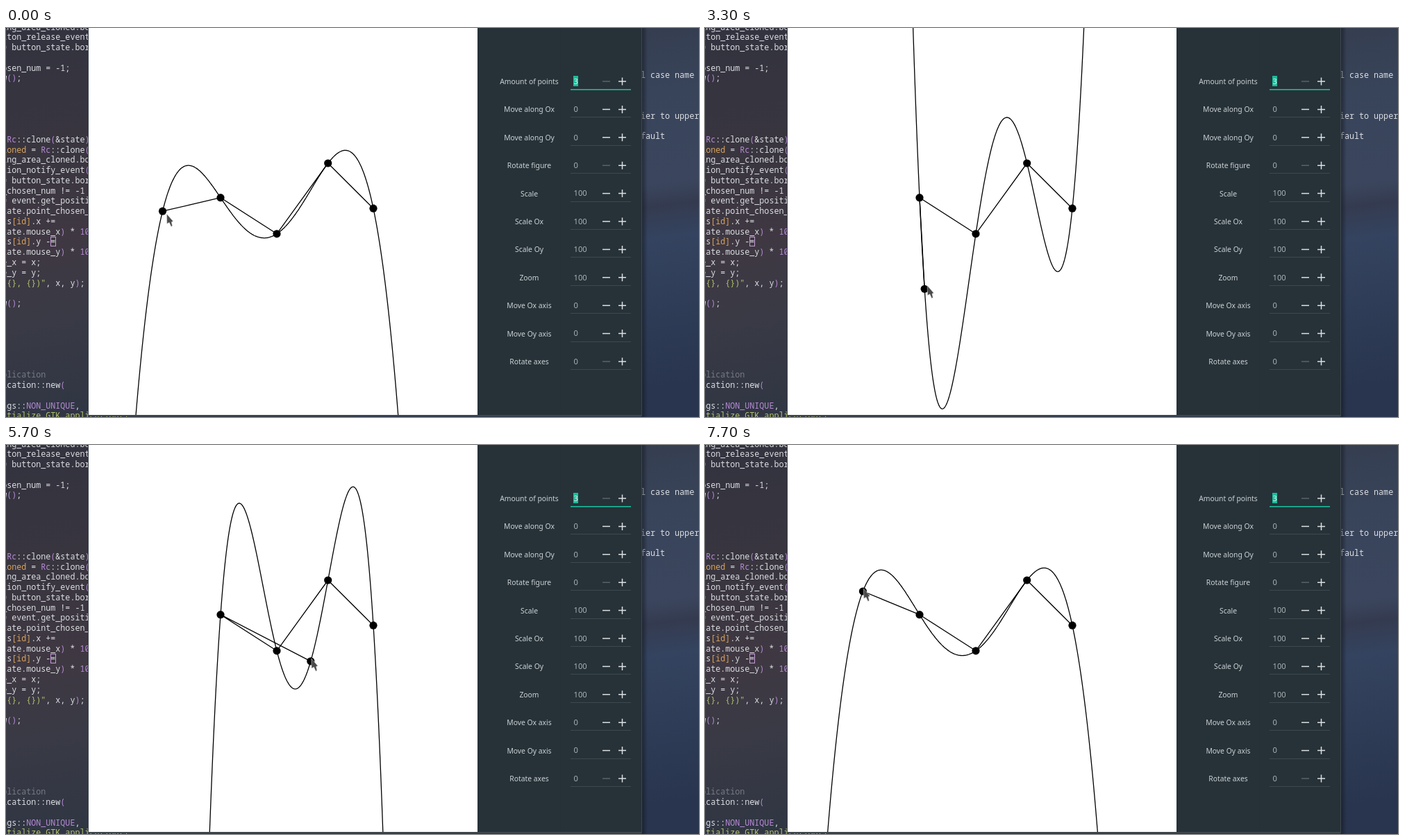
Animation, 998 px wide and 561 px high, one loop 8000 ms. Source, as an HTML page:

```html
<!DOCTYPE html>
<html lang="en">
<meta charset="utf-8">
<title>Curve editor</title>
<style>
  html, body { margin: 0; width: 100%; height: 100%; overflow: hidden; background: #2c2e3e; }
  svg { display: block; }
  text { white-space: pre; }
  .code { font: 11.7px "Noto Sans Mono", "DejaVu Sans Mono", monospace; fill: #dcdee2; }
  .lilac { fill: #b78bd6; }
  .gold { fill: #d9a45c; }
  .green { fill: #b3c46c; }
  .grey { fill: #777a84; }
  .label { font: 10.35px "Noto Sans", sans-serif; fill: #cbd1d4; text-anchor: middle; }
  .value { font: 11.2px "Noto Sans", sans-serif; fill: #a9b1b5; }
</style>
<svg width="998" height="561">
  <defs>
    <linearGradient id="left" x2=".15" y2="1">
      <stop offset="0" stop-color="#32333f"/><stop offset=".3" stop-color="#38353f"/>
      <stop offset=".55" stop-color="#3f3842"/><stop offset=".75" stop-color="#393a45"/>
      <stop offset="1" stop-color="#303643"/>
    </linearGradient>
    <linearGradient id="right" x2=".1" y2="1">
      <stop offset="0" stop-color="#343b4c"/><stop offset=".25" stop-color="#38445a"/>
      <stop offset=".48" stop-color="#3b465e"/><stop offset=".54" stop-color="#343b50"/>
      <stop offset=".62" stop-color="#34435f"/><stop offset="1" stop-color="#29354e"/>
    </linearGradient>
    <linearGradient id="shade">
      <stop offset="0" stop-color="#10141c" stop-opacity=".6"/>
      <stop offset="1" stop-color="#10141c" stop-opacity="0"/>
    </linearGradient>
  </defs>
  <rect width="500" height="561" fill="url(#left)"/>
  <rect x="500" width="498" height="561" fill="url(#right)"/>
  <g id="code"></g>
  <rect x="915" width="9" height="561" fill="url(#shade)"/>
  <rect x="118" width="798" height="560" fill="#3d474c"/>
  <rect x="679" width="236" height="558" fill="#263238"/>
  <rect x="798" width="1" height="558" fill="#243035"/>
  <g id="panel"></g>
  <svg x="119" width="560" height="558" viewBox="119 0 560 558">
    <rect x="119" width="560" height="558" fill="#fff"/>
    <g fill="none" stroke="#000" stroke-width="1.3" stroke-linejoin="round">
      <path id="curve"/><path id="chain"/>
    </g>
    <g id="dots"></g>
    <path id="cursor" d="M0 0L.3 14L3.6 12.2L6.4 18.3L8 17L6.8 11.6L9.2 10.6Z"
      fill="#4a4a4a" stroke="#ddd" stroke-width=".5"/>
  </svg>
</svg>
<script>
const $ = id => document.getElementById(id);

// Editor text behind the window
const source = `ing_area_cloned.bor
tton_release_event
= button_state.bor

osen_num = -1;
w();





 Rc::clone(&state)
loned = Rc::clone(
ing_area_cloned.bo
tion_notify_event(
= button_state.bor
_chosen_num != -1
= event.get_positi
tate.point_chosen_
ts[id].x +=
tate.mouse_x) * 10
ts[id].y -=
tate.mouse_y) * 10
e_x = x;
e_y = y;
({}, {})", x, y);

w();






plication
ication::new(

ags::NON_UNIQUE,
itialize GTK application()`;
const notes = '\n\n\n\n\nl case name\n\n\n\nier to upper\n\nfault';

const tokens = /(?<green>^\(\{.*"|^itialize.*)|(?<grey>^plication)|(?<gold>\bid\b|[[\]]|^loned)|(?<lilac>\bRc\b|NON_UNIQUE|\b10\b|[()])/g;
const paint = s => s.replace(/&/g, '&amp;').replace(tokens, (m, ...rest) => {
  const groups = rest.at(-1);
  return `<tspan class="${Object.keys(groups).find(k => groups[k])}">${m}</tspan>`;
});
const listing = (text, x, y) => text.split('\n').map((s, i) =>
  `<text class="code" x="${x}" y="${y + 14.76 * i}">${paint(s)}</text>`).join('');
$('code').innerHTML = listing(source, -5.8, 2.5) + listing(notes, 914, -2) +
  '<rect x="64.5" y="301.5" width="7" height="13" fill="none" stroke="#c59ad8"/>';

// Settings panel
const names = ['Amount of points', 'Move along Ox', 'Move along Oy', 'Rotate figure', 'Scale',
  'Scale Ox', 'Scale Oy', 'Zoom', 'Move Ox axis', 'Move Oy axis', 'Rotate axes'];
$('panel').innerHTML = names.map((name, i) => {
  const y = 77 + 40.4 * i, focus = i === 0;
  const value = focus ? 3 : /Scale|Zoom/.test(name) ? 100 : 0;
  const minus = /Amount|Rotate/.test(name) ? '#586369' : '#dce0e2';
  return `<text class="label" x="753.5" y="${y + 4}">${name}</text>
    ${focus ? '<rect x="817" y="69" width="7" height="15" fill="#1abc9c"/>' : ''}
    <text class="value" x="817.5" y="${y + 3.7}" ${focus ? 'style="fill:#e8eeee"' : ''}>${value}</text>
    <rect x="813" y="${Math.round(y + 11)}" width="87" height="${focus ? 1.6 : 1}" fill="${focus ? '#1abc9c' : '#3e494e'}"/>
    <path d="M859 ${y}h11" stroke="${minus}" stroke-width="1.5"/>
    <path d="M882 ${y}h11M887.5 ${y - 5.5}v11" stroke="#dce0e2" stroke-width="1.5"/>`;
}).join('');

// Control points; a further one is dragged
const fixed = [[309, 244.7], [390, 296.8], [463.7, 195], [529, 260.2]];
// Drag stops: end time, x, y, and how many 100 ms steps lead there
const stops = [
  [0, 225.5, 264.2, 1], [1600, 233.4, 169.6, 9], [2400, 256, 157, 8],
  [3300, 316.2, 376.3, 1], [4600, 397, 358, 9], [4700, 401.5, 356, 1],
  [5100, 418, 364, 3], [5500, 432, 336, 2], [5700, 438.8, 311.8, 1],
  [6000, 370, 307, 3], [6300, 340, 265, 2], [6700, 310.5, 240, 1],
  [6900, 286.2, 201.3, 2], [7400, 236, 192, 2], [7700, 227.4, 211, 2]
];

function dragged(t) {
  const i = stops.findLastIndex(([end, , , n]) => t > end - n * 100);
  const [end, x, y, n] = stops[i], [, px, py] = stops[Math.max(0, i - 1)];
  const k = Math.min(1, 1 + (t - end) / (100 * n));
  return [px + (x - px) * k, py + (y - py) * k];
}

// Pointer relative to the dragged point: approach, first grab, second grab
function grip(t) {
  const k = Math.min(1, t / 200);
  return t < 800 ? [6 - 4 * k, 4 - 6 * k] : t < 5000 ? [4, -4.7] : [1, -3.8];
}

const lagrange = (pts, x) => pts.reduce((sum, [xi, yi], i) =>
  sum + pts.reduce((p, [xj], j) => i === j ? p : p * (x - xj) / (xi - xj), yi), 0);

function draw(now) {
  const t = Math.floor(now % 8000 / 100) * 100;
  const pts = [dragged(t), ...fixed], [[x0, y0]] = pts, [dx, dy] = grip(t);
  const curve = [];
  for (let x = 118; x <= 680; x++) curve.push(`${x} ${lagrange(pts, x).toFixed(1)}`);
  $('curve').setAttribute('d', 'M' + curve.join('L'));
  $('chain').setAttribute('d', 'M' + pts.join('L'));
  $('dots').innerHTML = pts.map(([x, y]) => `<circle cx="${x}" cy="${y}" r="5.6"/>`).join('');
  $('cursor').setAttribute('transform', `translate(${x0 + dx} ${y0 + dy})`);
}

let start;
function tick(now) {
  start ??= now;
  draw(now - start);
  requestAnimationFrame(tick);
}
draw(0);
requestAnimationFrame(tick);
</script>
</html>
```
